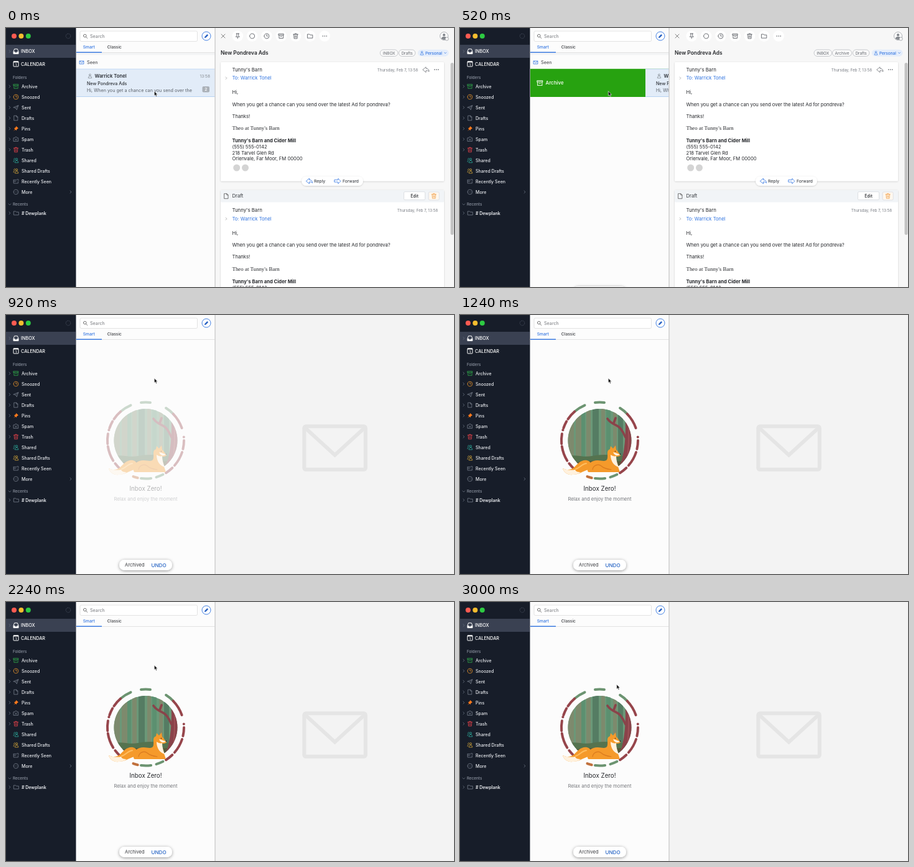
An HTML page that plays this animation: 720x417 px, repeating every 3.04 s.

```html
<!DOCTYPE html>
<html lang="en">
<head>
<meta charset="utf-8">
<title>Inbox swipe</title>
<style>
html, body { margin: 0; width: 100%; height: 100%; overflow: hidden; background: #f3f3f3; }
svg { display: block; width: 720px; height: 417px; }
text { font-family: Inter, "Open Sans", sans-serif; white-space: pre; }
.serif { font-family: "Liberation Serif", serif; }
.line { fill: none; stroke-linecap: round; stroke-linejoin: round; }
</style>
</head>
<body>
<svg id="stage" viewBox="0 0 720 417"></svg>
<script>
const LOOP = 3040, STEP = 40;
const person = "Warrick Tonel", shop = "Tunny's Barn", subject = "New Pondreva Ads";
const blue = "#2f73e0", ink = "#25272b", grey = "#85898f";

const text = (x, y, s, size, fill = ink, weight = 400, more = "") =>
  `<text x="${x}" y="${y}" font-size="${size}" fill="${fill}" font-weight="${weight}" ${more}>${s}</text>`;
const rect = (x, y, w, h, fill, r = 0, more = "") =>
  `<rect x="${x}" y="${y}" width="${w}" height="${h}" rx="${r}" fill="${fill}" ${more}/>`;
const dot = (x, y, r, fill, more = "") => `<circle cx="${x}" cy="${y}" r="${r}" fill="${fill}" ${more}/>`;
const shape = (d, fill, more = "") => `<path d="${d}" fill="${fill}" ${more}/>`;
const stroke = (d, color, width) => shape(d, "none", `stroke="${color}" stroke-width="${width}" stroke-linecap="round"`);
const ring = r => `M${-r} 0a${r} ${r} 0 1 1 ${2 * r} 0a${r} ${r} 0 1 1 ${-2 * r} 0`;
const middle = 'text-anchor="middle"', end = 'text-anchor="end"';

// Line icons, drawn around their own centre
const icons = {
  archive: "M-4-3.5h8v2h-8zM-3.3-1.5v5h6.6v-5M-1 .5h2",
  clock: ring(4) + "M0-2.3V0h1.8",
  sent: "M-4-.3L4-3.5 1.4 4-.5 1zM-.5 1L4-3.5",
  doc: "M-3-4h3.8l2.2 2.2V4h-6zM.8-4v2.2H3",
  spam: "M-3.8-2.2h1.6l1-1.4h2.4l1 1.4h1.6v5.8h-7.6zM-1.3-.6l2.6 2.6M1.3-.6l-2.6 2.6",
  trash: "M-3.8-2.8h7.6M-3-2.8L-2.5 4h5L3-2.8M-1.2-2.8V-4h2.4v1.2M-.9-.8v3M.9-.8v3",
  shared: "M-.6-1.8a1.7 1.7 0 1 1 3.4 0a1.7 1.7 0 1 1-3.4 0M-1.8 3.6c0-4.4 5.8-4.4 5.8 0zM-1.8-3.4c-2 0-2.2 2.6-.6 3C-4 .6-4.2 1.6-4 2.6",
  seen: "M-4-2.4h5M-4-2.4v5.6h7.6V0M-4 0h4M2-3.4h2v2",
  folder: "M-4-3h3l1 1.2h4v5h-8z",
  ring: ring(4),
  more: ring(4) + "M-1.8 0h.1M0 0h.1M1.8 0h.1",
  dots: "M-3 0h.1M0 0h.1M3 0h.1",
  close: "M-3-3l6 6M3-3l-6 6",
  pin: "M-2.2-4h4.4M-1.4-4v3.4l-1.6 1.8h6L1.4-.6V-4M0 1.2V4",
  user: "M-1.6-2a1.6 1.6 0 1 1 3.2 0a1.6 1.6 0 1 1-3.2 0M-3 3.2c0-4.6 6-4.6 6 0z",
  mail: "M-3.2-2.4h6.4v4.8h-6.4zM-3.2-2.2L0 .6l3.2-2.8",
  reply: "M-5 0L0-4.2v2.4c3 0 5 1.6 5 5C3.6 1.7 2 1.5 0 1.5V4z",
  forward: "M5 0L1-4v2.3h-6v3.4h6V4z",
  right: "M-1-2l2 2-2 2",
  down: "M-2-1l2 2 2-2",
  search: "M-3-.8a2.3 2.3 0 1 1 4.6 0a2.3 2.3 0 1 1-4.6 0M1 1l2.3 2.3"
};
const icon = (name, x, y, color, scale = 1, width = .8) =>
  `<path class="line" transform="translate(${x} ${y}) scale(${scale})" d="${icons[name]}" stroke="${color}" stroke-width="${width}"/>`;

function sidebar() {
  const dim = "#646c7b", pale = "#eef0f4", label = "#8f96a3", soft = "#7b8391";
  const folders = [
    ["Archive", "archive", "#31b34c"], ["Snoozed", "clock", "#f39a2c"], ["Sent", "sent", soft],
    ["Drafts", "doc", soft], ["Pins", "", "#ff7a1c"], ["Spam", "spam", soft],
    ["Trash", "trash", "#f0444c"], ["Shared", "shared", "#2fb8a6"], ["Shared Drafts", "shared", "#e5b33c"],
    ["Recently Seen", "seen", soft], ["More", "more", soft]
  ];
  let s = rect(0, 0, 112, 417, "#171d29") + rect(112, 0, 1, 417, "#8d9198") + rect(0, 27, 112, 21, "#3a4152");
  ["#ff5b52", "#f6bd2f", "#2dca42"].forEach((c, i) => s += dot(13 + i * 11.4, 13, 4, c));
  s += dot(100, 13, 3.8, "none", 'stroke="#4a5160" stroke-width=".8" stroke-dasharray="1.8 .8"');
  s += icon("right", 6, 37.5, dim) +
    shape("M12 38l1.6-4.2h4.8L20 38v3.6h-8z", "none", 'stroke="#fff"') +
    shape("M12 38h2.4l.7 1.4h1.8l.7-1.4H20v3.6h-8z", "#fff") + text(24, 40.1, "INBOX", 7.25, "#fff", 500);
  s += rect(12, 54, 8, 8, "none", .5, 'stroke="#fff"') + rect(12, 53.5, 8, 2, "#fff") +
    text(14.9, 61, "1", 4.5, "#fff", 700) + text(24, 60.6, "CALENDAR", 7.25, "#fff", 500);
  s += text(11, 81.7, "Folders", 6.3, label, 500);
  folders.forEach(([name, kind, color], i) => {
    const y = 94 + 17 * i;
    if (i < 7) s += icon("right", 6, y, dim);
    s += kind ? icon(kind, 16, y, color, .95)
      : shape("M.5-4L4-.5 2.8 0 1 1.8.8 3.2-3.2-.8-1.8-1 0-2.8zM-1.5.9L-4 4-.9 1.5z", color, `transform="translate(16 ${y})"`);
    s += text(25, y + 2.5, name, 7, pale, 500);
  });
  return s + icon("right", 104, 264, dim) + icon("down", 6, 284, dim) +
    text(11, 286.3, "Recents", 6.3, label, 500) +
    icon("right", 6, 298, dim) + icon("folder", 16.5, 298, soft, .95) +
    text(25, 300.5, "# Dewplank", 7, pale, 600);
}

function listHeader() {
  return rect(113, 0, 223, 417, "#fcfcfc") +
    rect(119, 5, 188.5, 16.5, "#fff", 2, 'stroke="#dcdcdc" stroke-width=".8"') +
    icon("search", 127.5, 13.3, "#555") + text(135, 15.8, "Search", 7.2, "#77797d") +
    dot(322, 13, 7, "#fff", `stroke="${blue}" stroke-width=".9"`) +
    shape("M318.9 16.2l.7-2.4 3.8-3.8 1.7 1.7-3.8 3.8z", "#245fc2") +
    text(123.7, 33.4, "Smart", 6.7, blue, 500) + text(162.8, 33.4, "Classic", 6.7, "#3b3d41", 500) +
    rect(113, 39.2, 223, .8, "#dedede") + rect(113, 38.5, 41, 1.4, blue);
}

function mailRow() {
  return `<g clip-path="url(#rowClip)">
    <g id="under">${rect(113, 65.5, 223, 45.5, "#27a210")}
      ${icon("archive", 128.3, 88.7, "#e6f6e2", 1.1, 1)}${text(137.5, 91.2, "Archive", 7.8, "#e6f6e2", 600)}</g>
    <g id="row">
      ${rect(113, 65.5, 223, 45.5, "#e2ecf8", 0, 'id="rowFill"')}
      <g id="rowEdge">${rect(113, 65.5, 223, .9, "#b3d0f3")}${rect(113, 110.1, 223, .9, "#b3d0f3")}</g>
      ${icon("user", 135, 77.3, "#7d838b", .9)}
      ${text(142.5, 80, person, 7.7, "#2b2f35", 600)}
      ${text(130, 91.9, subject, 7.1, "#2b2f35", 500)}
      ${text(130, 102.7, "Hi, When you get a chance can you send over the", 7.2, "#5a6068")}
      ${text(328, 80, "13:58", 6.5, grey, 400, end)}
      ${rect(315.5, 94, 11.5, 9.5, "#abb1b8", 2)}${text(321.3, 101.1, "2", 6.5, "#fff", 600, middle)}
    </g></g>`;
}

function letter(dateEnd) {
  const line = (y, s, weight) => text(363.5, y, s, 7.66, ink, weight);
  return text(363.5, 69.8, shop, 7.8) +
    text(dateEnd, 69.6, "Thursday, Feb 7, 13:58", 6.2, "#777b82", 400, end) +
    icon("right", 354, 80.7, "#999", .9) + text(363.5, 83.3, "To: " + person, 7.65, blue) +
    line(106, "Hi,") + line(125.5, "When you get a chance can you send over the latest Ad for pondreva?") +
    line(144.8, "Thanks!") +
    text(363.5, 164.3, "Theo at " + shop, 8.9, ink, 400, 'class="serif"') +
    line(184.3, shop + " and Cider Mill", 700) + line(194, "(555) 555-0142") +
    line(203.7, "218 Tarvel Glen Rd") + line(213.4, "Orlenvale, Far Moor, FM 00000") +
    dot(370.7, 225, 5.5, "#d4d4d4") + dot(384.5, 225, 5.5, "#d4d4d4");
}

function tag(x, w, name, id = "") {
  return `<g ${id && `id="${id}"`}>${rect(x, 35, w, 10.5, "#fafafa", 5.2, 'stroke="#b9bcc1" stroke-width=".8"')}
    ${text(x + w / 2, 42.5, name, 6.4, "#62666d", 400, middle)}</g>`;
}

function reader() {
  const tools = ["pin", "ring", "clock", "archive", "trash", "folder", "dots"];
  const shadow = 'filter="url(#soft)"';
  let s = rect(337, 0, 383, 417, "#f7f7f7") + icon("close", 349, 13, "#666");
  tools.forEach((name, i) => {
    const x = 372.3 + i * 23.3;
    s += dot(x, 13, 8.8, "#fff") + icon(name, x, 13, "#55595f", 1, name === "dots" ? 1.5 : .85);
  });
  s += dot(704, 13, 6.5, "#fff", 'stroke="#9a9da2" stroke-width=".8"') +
    dot(704, 11.2, 2.1, grey) + shape("M699.5 17.2c1-4.5 8-4.5 9 0q-4.5 3.5-9 0z", grey) +
    dot(708.5, 17.5, 2.6, "#fff", `stroke="${grey}" stroke-width=".7"`);
  s += text(345, 43.2, subject, 8.4, ink, 600) +
    tag(601.3, 28.5, "INBOX", "inboxTag") + tag(598.5, 31, "Archive", "archiveTag") + tag(631.3, 26.5, "Drafts") +
    rect(662, 34.7, 49.5, 11, "#e4edfb", 5.5) + icon("user", 668.5, 40.3, blue, .8) +
    text(674, 42.5, "Personal", 6.45, blue, 500) + icon("down", 706, 40.2, blue, .8);
  s += rect(345, 55, 359, 191.5, "#fff", 1.5, shadow) + letter(662) +
    icon("reply", 675, 67, "#6c7077") + icon("dots", 691.7, 67, "#50545a", 1, 1.6);
  s += rect(475, 239, 99, 15, "#fff", 7.5, shadow) +
    icon("reply", 487.5, 246.3, blue) + text(495, 248.9, "Reply", 6.8, "#45484d", 500) +
    icon("forward", 532.7, 246.3, blue) + text(541, 248.9, "Forward", 6.6, "#45484d", 500);
  s += rect(345, 261, 359, 170, "#fff", 1.5, shadow) + rect(345, 261, 359, 19.5, "#f1f4f7", 1.5) +
    icon("doc", 354, 270.7, "#555") + text(363.5, 273.4, "Draft", 7.7, "#36393e") +
    rect(639.5, 263.7, 34, 13, "#fff", 1.5, 'stroke="#d5d8dc" stroke-width=".8"') +
    text(656.5, 272.7, "Edit", 7, ink, 500, middle) +
    rect(679.2, 264, 17, 13, "#fff8ef", 2, 'stroke="#d8dbe0" stroke-width=".8"') + icon("trash", 687.7, 270.5, "#f09a3e", .95);
  return s + `<g transform="translate(0 226.5)">${letter(694)}</g>` + rect(714.5, 56, 5, 277, "#c3c3c3", 2.5);
}

function emptyReader() {
  const edge = 'stroke="#e5e5e5" stroke-width="6"';
  return rect(337, 0, 383, 417, "#f3f3f3") +
    rect(479.3, 179.3, 98.5, 69.5, "none", 2.5, edge) + shape("M480 181l48.5 44.5L577 181", "none", edge);
}

function dashes(cx, cy, r) {
  const red = "#96454b", green = "#6c9471";
  const at = deg => {
    const a = deg * Math.PI / 180;
    return (cx + r * Math.sin(a)).toFixed(1) + " " + (cy - r * Math.cos(a)).toFixed(1);
  };
  // Degrees clockwise from the top
  return [
    [-7, 7, green], [-41, -23, green], [-56, -41, red], [-71, -60, red], [-74.1, -74, red], [-95, -80, red],
    [-122, -99, red], [-139, -127, red], [32, 46, green], [46, 71, red], [84.9, 85, red], [90, 103, red],
    [108, 131, red], [136, 148, red], [153, 164, green], [172, 187, green], [192, 199, "#c0703c"]
  ].map(([a, b, c]) => stroke(`M${at(a)}A${r} ${r} 0 0 1 ${at(b)}`, c, 4)).join("");
}

function forest() {
  const olive = "#7d8a6d", leaf = "#5c9070", deep = "#557c63", bark = "#8a434a";
  const trunk = (x, w, c) => rect(x, 148, w, 96, c);
  return `<g clip-path="url(#disc)">${rect(173, 150, 103, 104, "#6b9878")}` +
    trunk(173, 10, olive) + trunk(186, 9, olive) + trunk(195, 6, leaf) + trunk(203, 7, olive) +
    trunk(213, 10, deep) + trunk(227, 6, olive) + trunk(235, 7, leaf) + trunk(246, 6, olive) + trunk(254, 8, deep) +
    shape("M170 228c14-5 28 2 42-1s26-3 66 2v28H170z", "#55734f") +
    shape("M170 240c26-7 70-5 108-4v20H170z", "#565a3a") +
    shape("M264 148c3 26 3 56-3 82-1 6-4 11-8 16h26V148z", bark) +
    stroke("M237 167c6 9 12 8 18 13s7 9 11 17M247 174l3-8M270 168l6-6", bark, 3.6) +
    stroke("M271 156c0 28 1 58-3 86", "#a4545a", 1.4) + "</g>";
}

function fox() {
  const fur = "#f59a2b", cream = "#fff1dd", dark = "#d9791f";
  return shape("M211 240c-2-5-8-8-15-5-8 3-10 10-17 13-5 2-9 1-14-1 2 7 8 11 17 10 14-1 18-9 29-8z", fur) +
    shape("M165 247c2 7 8 11 17 10 6 0 9-2 12-4-5 0-8-1-9-4-5 1-12 1-20-2z", cream) +
    stroke("M186 248c7-2 9-8 17-9", "#ffbf62", 2) +
    shape("M205 248c0-9 7-14 16-14 6 0 10 2 14 0 3-2 2-8 2-12 0-3 1-5 4-6l1-5 4 4 4-5 1 7c3 2 4 6 7 8 0 3-4 3-8 3 0 8 4 15 6 22l1 3h-50c-2 0-2-3-2-5z", fur) +
    shape("M242 225c3 2 6 3 9 2 0 7 2 12 4 18-7-2-13-9-13-20z", cream) +
    shape("M246 221c4 0 7 3 11 3-2 3-8 4-11-3z", cream) +
    dot(249.5, 219.5, .8, "#30282a") + dot(257.5, 224, .9, "#30282a") +
    stroke("M213 249c1-7 9-10 14-6 4 4 9 5 16 6", dark, 1.1);
}

function zero() {
  const cx = 224.5;
  return dashes(cx, 202, 61.5) + forest() + fox() +
    text(cx, 283, "Inbox Zero!", 9.75, ink, 400, middle) +
    text(cx, 299, "Relax and enjoy the moment", 7.65, "#77797d", 400, middle);
}

const stage = document.getElementById("stage");
stage.innerHTML = `<defs>
  <clipPath id="rowClip"><rect x="113" y="65.5" width="223" height="45.5"/></clipPath>
  <clipPath id="disc"><circle cx="224.5" cy="202" r="51"/></clipPath>
  <filter id="soft" x="-10%" y="-20%" width="120%" height="150%"><feDropShadow dx="0" dy=".7" stdDeviation="1.2" flood-opacity=".2"/></filter>
  <filter id="deep" x="-20%" y="-60%" width="140%" height="240%"><feDropShadow dx="0" dy="1" stdDeviation="2.6" flood-opacity=".42"/></filter>
</defs>
${listHeader()}
<g id="list">${rect(113, 40, 223, 3.5, "#f3f4f5")}${icon("mail", 121.7, 55.5, blue)}${text(130, 58.1, "Seen", 7.3, "#3b3d41")}${mailRow()}</g>
<g id="zero">${zero()}</g>
<g id="toast">${rect(182, 394, 85, 17, "#fff", 8.5, 'filter="url(#deep)"')}${text(191, 405.2, "Archived", 7.55, "#3b3d41")}${text(233.5, 405.5, "UNDO", 8.1, "#2563c4", 500)}</g>
<g id="reader">${reader()}</g>
<g id="empty">${emptyReader()}</g>
${rect(335.3, 0, 1.5, 417, "#cfcfcf")}
${sidebar()}
<g id="cursor">${shape("M0 0v7.5L1.7 6l1.2 2.7 1.3-.6L3 5.500h2.300z", "#111", 'stroke="#fff" stroke-width=".6"')}</g>`;

const part = id => document.getElementById(id);
const show = (id, on) => part(id).setAttribute("visibility", on ? "visible" : "hidden");
const fade = (id, v) => part(id).setAttribute("opacity", v);
const move = (id, x, y) => part(id).setAttribute("transform", `translate(${x} ${y})`);

// Value at time t along [time, value] pairs
function along(keys, t) {
  if (t <= keys[0][0]) return keys[0][1];
  for (let i = 1; i < keys.length; i++) {
    const [a, from] = keys[i - 1], [b, to] = keys[i];
    if (t <= b) return from + (to - from) * (t - a) / (b - a);
  }
  return keys[keys.length - 1][1];
}

const swipe = [[0, 0], [40, 3], [120, 25], [200, 70], [280, 118], [360, 154], [440, 176], [520, 185], [560, 178], [640, 25], [680, 0]];
const toastDrop = [[480, 32], [520, 22], [560, 12], [600, 5], [680, 0]];

function draw(t) {
  const x = along(swipe, t), archived = t >= 600, tagged = t >= 480;
  move("row", x, 0);
  show("under", x > 0);
  part("rowFill").setAttribute("fill", archived ? "#edf2f5" : "#e2ecf8");
  show("rowEdge", !archived);
  fade("row", along([[560, 1], [680, .75], [800, 0]], t));
  fade("list", along([[760, 1], [880, 0]], t));
  fade("zero", along([[840, 0], [1080, 1]], t));
  show("reader", !archived);
  show("empty", archived);
  part("archiveTag").setAttribute("display", tagged ? "inline" : "none");
  move("inboxTag", tagged ? -32.3 : 0, 0);
  show("toast", tagged);
  move("toast", 0, along(toastDrop, t));
  const drift = along([[2800, 0], [3000, 1]], t) ** 1.5;
  move("cursor", 238.3 + 13.5 * drift, 101.7 + 31 * drift);
}

const start = performance.now();
function tick() {
  const t = (performance.now() - start) % LOOP;
  draw(Math.floor(t / STEP) * STEP);
  requestAnimationFrame(tick);
}
draw(0);
requestAnimationFrame(tick);
</script>
</body>
</html>
```
